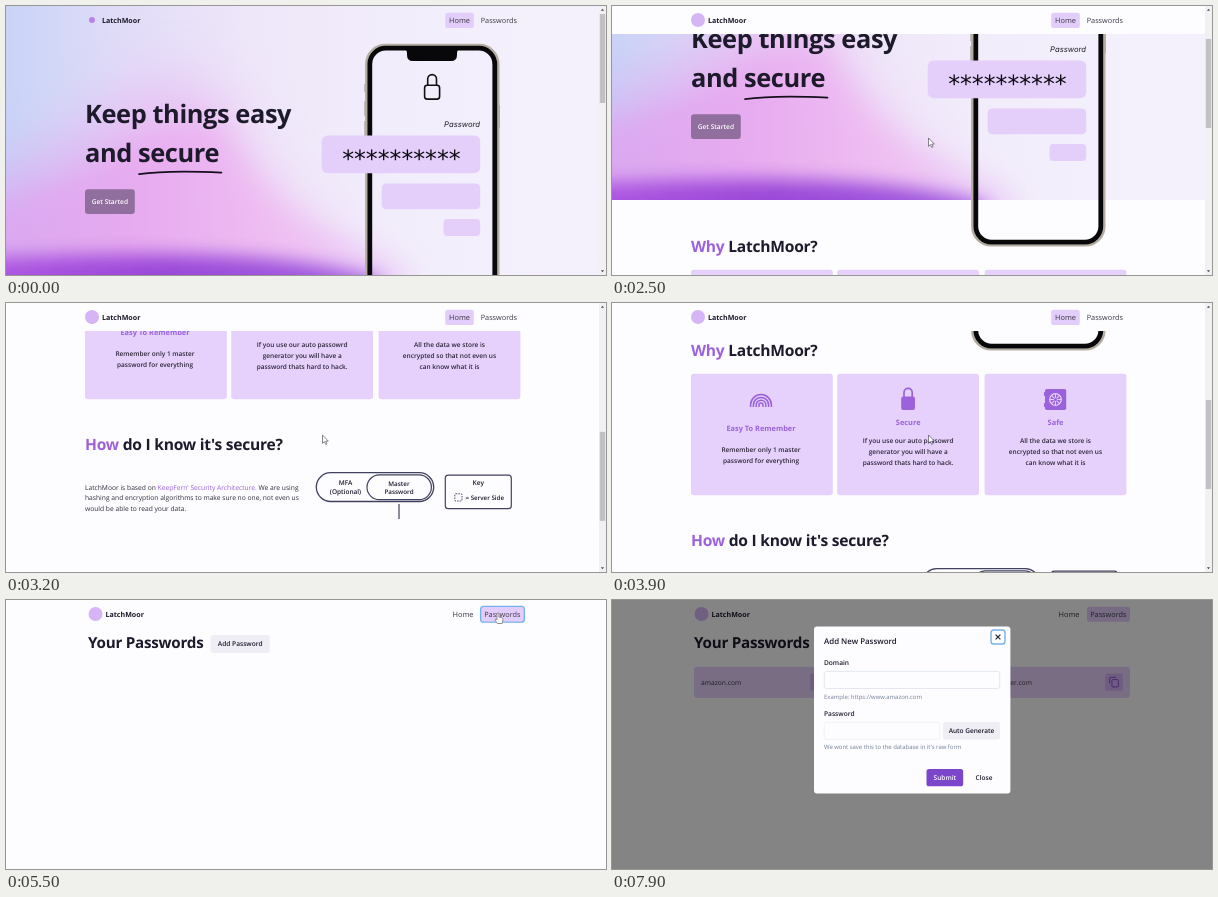
An HTML page that plays this animation: 600 by 269 pixels, repeating every 8000 ms.

```html
<!DOCTYPE html>
<html lang="en">
<head>
<meta charset="utf-8">
<title>Password manager tour</title>
<style>
html, body { margin: 0; height: 100%; overflow: hidden; background: #fdfcff; }
svg { display: block; font-family: "Open Sans", "Noto Sans", sans-serif; text-rendering: geometricPrecision; }
#stage { width: 100vw; height: 100vh; }
text { white-space: pre; }
</style>
</head>
<body>
<svg id="stage" viewBox="0 0 600 269" preserveAspectRatio="none"></svg>
<script>
const LOOP = 8000, STEP = 100;
const INK = '#1d1a2b', PURPLE = '#9b62db', LILAC = '#e5d1fb', PAPER = '#fdfcff', LINE = '#41425f';
const BRAND = 'LatchMoor';

const rect = (x, y, w, h, r, fill, extra = '') =>
  `<rect x="${x}" y="${y}" width="${w}" height="${h}" rx="${r}" fill="${fill}" ${extra}/>`;
const path = (d, stroke, width, extra = '') =>
  `<path d="${d}" fill="none" stroke="${stroke}" stroke-width="${width}" ${extra}/>`;
const text = (x, y, size, str, { weight = 400, fill = INK, anchor = 'start', extra = '' } = {}) =>
  `<text x="${x}" y="${y}" font-size="${size}" font-weight="${weight}" fill="${fill}" text-anchor="${anchor}" ${extra}>${str}</text>`;
const title = (x, y, size, str) =>
  text(x, y, size, str, { weight: 700, extra: 'letter-spacing="-.016em"' });
const label = (x, y, size, str, fill = INK, weight = 600) =>
  text(x, y, size, str, { weight, fill, anchor: 'middle' });
const lines = (x, y, size, rows) =>
  rows.map((row, i) => label(x, y + i * 10.6, size, row, '#2d2438')).join('');
const tint = str => `<tspan fill="${PURPLE}">${str}</tspan>`;
const group = (id, body) => `<g id="${id}">${body}</g>`;

const gradient = (id, ...stops) => `<linearGradient id="${id}">${stops.map(([at, color]) =>
  `<stop offset="${at}" stop-color="${color}"/>`).join('')}</linearGradient>`;
const blur = radius => `<filter id="blur${radius}" filterUnits="userSpaceOnUse" x="-150" y="-100" width="900" height="500"
  color-interpolation-filters="sRGB"><feGaussianBlur stdDeviation="${radius}"/></filter>`;
const cloud = (d, fill, radius, alpha) =>
  `<path d="${d}" fill="${fill}" opacity="${alpha}" filter="url(#blur${radius})"/>`;

// Soft blurred shapes on a pale base, cut off at the bottom of the hero.
function background() {
  return `<svg width="600" height="269"><defs>
    ${gradient('base', [0, '#c8d4f7'], [.2, '#e2dcf8'], [.4, '#eee6f9'], [.65, '#f2edfb'], [1, '#f5f1fc'])}
    ${gradient('pink', [0, '#d6a2f0'], [.45, '#e8a4ef'], [.75, '#efb9f1'], [1, '#e6c4f6'])}
    ${gradient('violet', [0, '#b355e4'], [.5, '#9440d6'], [1, '#9a55de'])}
    ${blur(9)}${blur(14)}${blur(28)}</defs>` +
    rect(0, 0, 600, 269, 0, 'url(#base)') +
    cloud('M-90 360V190Q40 150 110 95Q190 50 225 100Q250 180 320 225L400 360Z', 'url(#pink)', 28, .55) +
    cloud('M-90 360V215Q50 185 120 140Q190 105 218 120Q245 180 310 222L400 262V360Z', 'url(#pink)', 14, .72) +
    cloud('M-90 360V256Q80 246 190 249Q290 250 372 272L400 360Z', 'url(#violet)', 9, .92) + '</svg>';
}

function phone() {
  const button = (x, y, h) => rect(x, y, 1.4, h, .5, '#a59d95');
  return button(358.4, 78, 8) + button(358.4, 95, 15) + button(358.4, 115, 15) + button(492.4, 99, 23) +
    rect(360.3, 39, 132, 275.4, 19, 'none', 'stroke="#b5aca2" stroke-width="2.4"') +
    rect(363.8, 42.2, 125, 269, 16, 'none', 'stroke="#08070a" stroke-width="4.8"') +
    '<path d="M399 43H453Q451 44 451 47V49Q451 55 445 55H407Q401 55 401 49V47Q401 44 399 43Z" fill="#08070a"/>' +
    rect(418.6, 79.3, 15, 13.8, 2.6, 'none', 'stroke="#111" stroke-width="1.6"') +
    path('M421.7 79V73A4.4 4.4 0 0 1 430.5 73V79', '#111', 1.6) +
    text(474, 121, 7.7, 'Password', { anchor: 'end', extra: 'font-style="italic" font-family="Inter, sans-serif"' }) +
    rect(315.7, 129.5, 158.5, 37.7, 6, '#e4cffb') +
    text(395.4, 161.2, 23.7, '*'.repeat(10), { anchor: 'middle', fill: '#0c0a10', extra: 'font-family="DejaVu Sans, sans-serif"' }) +
    rect(375.7, 177.5, 98.5, 25.7, 4.5, '#e4cffb') + rect(437.5, 213, 36.7, 17, 4, '#e4cffb');
}

function hero() {
  return background() + title(79, 116.6, 25.4, 'Keep things easy') + title(79, 156, 25.4, 'and secure') +
    path('M133 168.2C151 165.6 184 165.2 215.5 166.6', '#15101c', 1.7, 'stroke-linecap="round"') +
    rect(79, 183.3, 49.8, 24.7, 3, '#906e9d') + label(103.9, 198, 6.6, 'Get Started', '#fff') + phone();
}

function features() {
  const arc = r => path(`M${149 - r} 372V370A${r} ${r} 0 0 1 ${149 + r} 370V372`, PURPLE, 1.5);
  const spokes = [0, 1, 2, 3].map(i =>
    `<path d="M437.8 364.5H449.2" stroke="${LILAC}" stroke-width="1" transform="rotate(${i * 45} 443.5 364.5)"/>`).join('');
  return title(79, 321, 15.6, `${tint('Why')} ${BRAND}?`) +
    [79, 225.2, 372.6].map(x => rect(x, 338.7, 141.8, 121.6, 3, LILAC)).join('') +
    [10.4, 7.6, 4.8, 2].map(arc).join('') +
    label(149, 396, 7.4, 'Easy To Remember', PURPLE, 700) +
    lines(149, 417.2, 6.5, ['Remember only 1 master', 'password for everything']) +
    rect(289.2, 361.5, 13.8, 13.6, 2, PURPLE) + path('M292 362V357.5A4.1 4.1 0 0 1 300.2 357.5V362', PURPLE, 1.7) +
    label(296.2, 390.3, 7.4, 'Secure', PURPLE, 700) +
    lines(296.2, 408.4, 6.5, ['If you use our auto passowrd', 'generator you will have a', 'password thats hard to hack.']) +
    rect(433, 354, 21.2, 21, 1.8, PURPLE) + rect(432, 357, 2, 4, .5, PURPLE) + rect(432, 368, 2, 4, .5, PURPLE) +
    `<circle cx="443.5" cy="364.5" r="5.8" fill="none" stroke="${LILAC}" stroke-width="1.3"/>` + spokes +
    `<circle cx="443.5" cy="364.5" r="1.6" fill="${PURPLE}"/>` +
    label(443.5, 390.3, 7.4, 'Safe', PURPLE, 700) +
    lines(443.5, 408.4, 6.5, ['All the data we store is', 'encrypted so that not even us', 'can know what it is']);
}

function proof() {
  const outline = (x, y, w, h, r, width) => rect(x, y, w, h, r, PAPER, `stroke="${LINE}" stroke-width="${width}"`);
  const row = (y, str) => text(79, y, 6.7, str, { fill: '#2f2c3a' });
  return title(79, 511, 15.6, `${tint('How')} do I know it's secure?`) +
    row(551, `${BRAND} is based on ${tint("KeepFern' Security Architecture.")} We are using`) +
    row(561.4, 'hashing and encryption algorithms to make sure no one, not even us') +
    row(571.8, 'would be able to read your data.') +
    outline(310.3, 533.7, 117.4, 28.8, 14.4, 1.3) + outline(361, 535.9, 64.4, 24.8, 12.4, 1.2) +
    label(339.5, 546.4, 6.5, 'MFA') + label(339.5, 555, 6.5, '(Optional)') +
    label(393, 546.8, 6.3, 'Master') + label(393, 555, 6.3, 'Password') +
    path('M393 565V580', LINE, 1.2) +
    outline(439.3, 536.2, 66, 33.5, 3, 1.2) + label(472.3, 546.3, 6.6, 'Key') +
    rect(448.8, 554.8, 7.2, 7.2, 1, 'none', `stroke="${LINE}" stroke-width=".9" stroke-dasharray="1.6 1"`) +
    text(459.5, 560.8, 6.2, '= Server Side', { weight: 600 });
}

function vault() {
  const entry = (x, site) => rect(x, 66.7, 140.7, 31.4, 3, LILAC) + text(x + 7, 85, 6.7, site, { fill: '#39313f' }) +
    rect(x + 116, 73.4, 17.6, 17.4, 2.6, '#d3aff6') +
    path(`M${x + 120.5} 83.5V78.2Q${x + 120.5} 77.4 ${x + 121.3} 77.4H${x + 126.8}`, '#8548c9', .9) +
    rect(x + 122.7, 79.6, 6.4, 7.3, .8, 'none', 'stroke="#8548c9" stroke-width=".9"');
  return rect(0, 0, 600, 269, 0, PAPER) + title(82, 47.6, 15.2, 'Your Passwords') +
    rect(204.6, 35, 59.2, 18, 3, '#efedf5') + label(234.2, 46.4, 6.6, 'Add Password') +
    group('entries', entry(82, 'amazon.com') + entry(229.6, 'facebook.com') + entry(377.2, 'twitter.com'));
}

function nav() {
  const ring = 'stroke="#74b0ec" stroke-width="1.3"';
  return rect(0, 0, 600, 28, 0, PAPER, 'id="bar"') +
    '<circle id="logo" cx="86" cy="14"/>' + text(96, 17, 7.1, BRAND, { weight: 700 }) +
    rect(439.2, 6.8, 28.6, 15.2, 2.6, '#e3cdfa', 'id="homeTab"') +
    rect(438.8, 6.2, 29.4, 16.2, 3, 'none', `id="homeRing" ${ring}`) +
    rect(471.5, 6.8, 43, 15, 2.6, '#e3cdfa', 'id="passTab"') +
    rect(471.1, 6.4, 43.8, 15.8, 3, 'none', `id="passRing" ${ring}`) +
    text(443, 17.2, 7.4, 'Home', { fill: '#3b3546' }) + text(474.7, 17.2, 7.3, 'Passwords', { fill: '#3b3546' });
}

function modal() {
  const field = (y, w, color) => rect(212.3, y, w, 17.2, 2.5, PAPER, `stroke="${color}" stroke-width=".8"`);
  const hint = (y, str) => text(212, y, 5.95, str, { fill: '#728097' });
  return rect(202, 26.5, 196.4, 167, 3, PAPER) + text(212, 43.6, 7.9, 'Add New Password', { weight: 600 }) +
    rect(379, 30, 14, 14, 2.8, PAPER, 'stroke="#78b2e8" stroke-width="1.4"') +
    path('M383.6 34.6L388.4 39.4M388.4 34.6L383.6 39.4', INK, 1.1) +
    text(212, 65, 6.6, 'Domain', { weight: 600 }) + field(71.3, 175.4, '#dfe3ec') +
    hint(98.8, 'Example: https://www.amazon.com') +
    text(212, 115.6, 6.6, 'Password', { weight: 600 }) + field(122.2, 115.4, '#f0eef5') +
    rect(331, 121.9, 57, 17.5, 2.6, '#eeeef4') + label(359.5, 133.1, 6.5, 'Auto Generate') +
    hint(149.2, "We wont save this to the database in it's raw form") +
    rect(314.5, 169, 36.7, 17.3, 2.6, '#7c46cc') + label(332.9, 180.1, 6.6, 'Submit', '#fff') + label(372, 180.1, 6.5, 'Close');
}

const scrollbar = rect(593, 0, 7, 269, 0, '#f1f0f3') + rect(593.8, 0, 5.4, 89, 0, '#c1c0c4', 'id="thumb"') +
  '<path d="M594.8 4.8L596.5 2.8L598.2 4.8ZM594.8 264.2L596.5 266.2L598.2 264.2Z" fill="#55525a"/>';
const cursor =
  '<path id="arrow" d="M0 0V8.3L1.9 6.6L3.2 9.4L4.5 8.8L3.2 6.1H5.8Z" fill="#fff" stroke="#3b3744" stroke-width=".6"/>' +
  '<path id="hand" d="M-1 .4Q0 -.8 .9 .4V4.1L4 4.8Q5.1 5.2 4.9 6.8L4.2 10.5H-.7L-3 6.9Q-3.2 5.4-1 6.6Z" fill="#fff" stroke="#6d6875" stroke-width=".7"/>';

const stage = document.getElementById('stage');
stage.innerHTML = group('home', rect(0, 0, 600, 269, 0, PAPER) + group('page', features() + proof() + hero())) +
  group('vault', vault()) + group('nav', nav()) + group('bars', scrollbar) +
  rect(0, 0, 600, 269, 0, '#000', 'id="shade"') + group('modal', modal()) + group('cursor', cursor);
const el = id => document.getElementById(id);
const show = (id, on) => el(id).setAttribute('visibility', on ? 'inherit' : 'hidden');
const set = (id, name, value) => el(id).setAttribute(name, value);

const scrollKeys = [[2400, 0], [2800, 300], [3300, 380], [3700, 380], [3900, 268], [4200, 0]];
const mouseKeys = [
  [700, 520, 60], [900, 455, 16], [1000, 455, 16], [1300, 221, 186], [1400, 221, 186], [1500, 216, 182],
  [1900, 300, 150], [2000, 300, 150], [2200, 316.5, 132], [4000, 316.5, 132], [4500, 471.5, 14], [4700, 471.5, 14],
  [5000, 492, 13], [6100, 492, 13], [6500, 310, 112], [6700, 256, 71], [7000, 236, 42], [7100, 236, 42], [7500, 300, 80]
];

// Linear interpolation of every column after the time.
function at(keys, t) {
  const next = keys.findIndex(k => k[0] > t);
  if (next === 0) return keys[0].slice(1);
  if (next < 0) return keys[keys.length - 1].slice(1);
  const a = keys[next - 1], b = keys[next], p = (t - a[0]) / (b[0] - a[0]);
  return a.slice(1).map((v, i) => v + (b[i + 1] - v) * p);
}
const within = (t, from, to) => t >= from && t < to;

function draw(t) {
  const [scroll] = at(scrollKeys, t), [x, y] = at(mouseKeys, t);
  const onVault = t >= 5300, overHero = !onVault && scroll < 40;
  show('home', !onVault);
  show('bars', !onVault);
  show('vault', onVault);
  show('entries', t >= 5900);
  set('page', 'transform', `translate(0 ${-scroll})`);
  set('thumb', 'y', 8 + scroll * .332);

  set('nav', 'transform', `translate(${onVault ? 3.5 : 0} 0)`);
  show('bar', !onVault && !overHero);
  set('logo', 'r', overHero ? 3 : 7);
  set('logo', 'fill', overHero ? '#b982e6' : '#d5b5f5');
  show('homeTab', !onVault);
  show('homeRing', within(t, 900, 2200));
  show('passTab', onVault);
  show('passRing', within(t, 5300, 7100));

  const open = Math.min(1, Math.max(0, (t - 7000) / 200)), size = .95 + .05 * open;
  set('shade', 'opacity', .48 * open);
  set('modal', 'opacity', open);
  set('modal', 'transform', `translate(300 110) scale(${size}) translate(-300 -110)`);

  const hand = within(t, 900, 1100) || within(t, 4500, 6200) || within(t, 6900, 7200);
  show('cursor', within(t, 700, 7500));
  show('arrow', !hand);
  show('hand', hand);
  set('cursor', 'transform', `translate(${x} ${y})`);
}

function tick() {
  const t = performance.now() % LOOP;
  draw(Math.floor(t / STEP) * STEP);
  requestAnimationFrame(tick);
}
tick();
</script>
</body>
</html>
```
